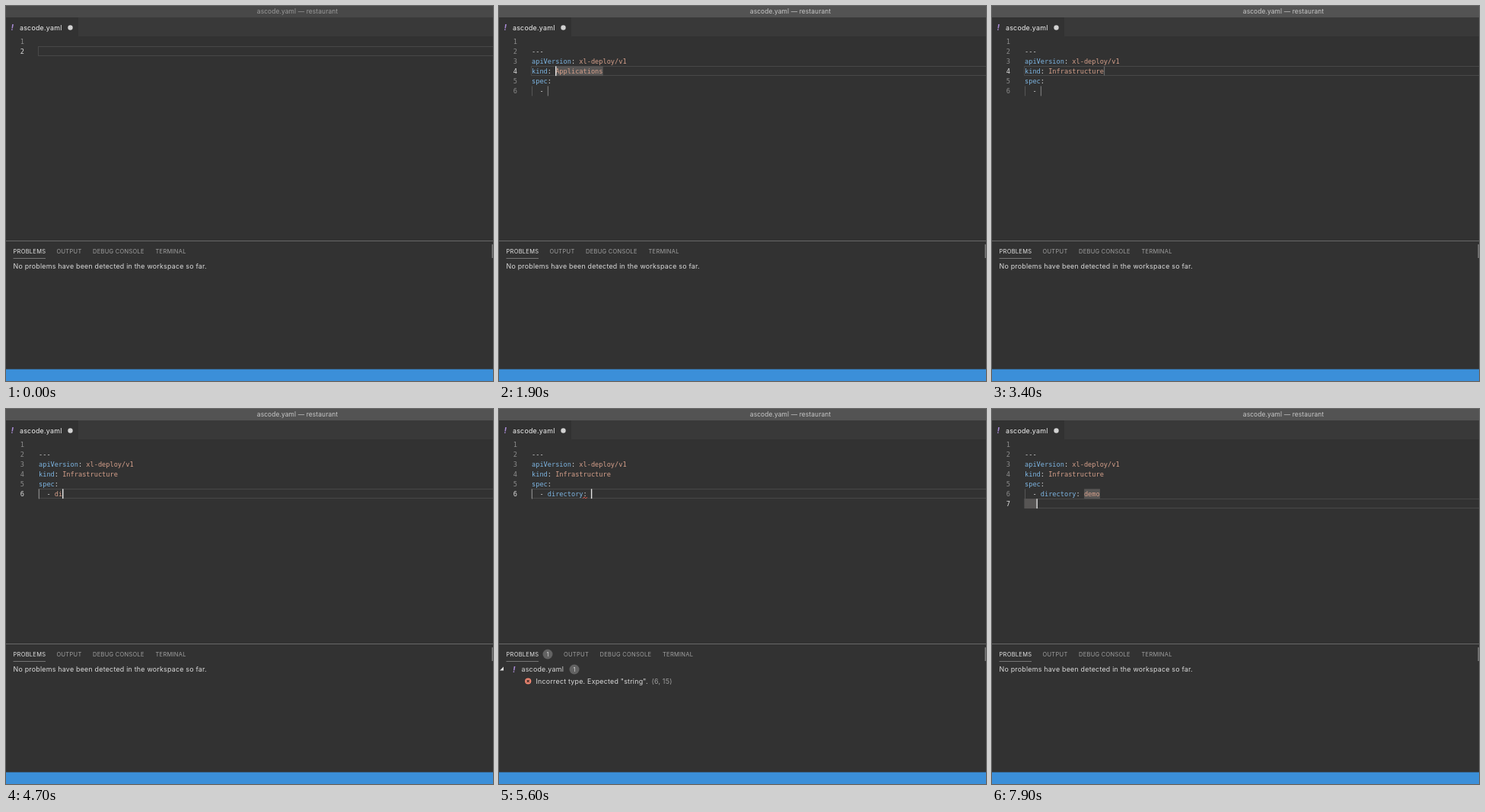
An HTML page for the animation above (8 s loop, 640 by 494 pixels).

```html
<!DOCTYPE html>
<html lang="en">
<head>
<meta charset="utf-8">
<title>Editor autocomplete</title>
<style>
  html, body { margin: 0; height: 100%; overflow: hidden; background: #323232; }
  svg { display: block; width: 640px; height: 494px; }
  text { white-space: pre; font: 8.9px Inter, sans-serif; letter-spacing: .22px; fill: #dadada; }
  .mono { font: 8.65px "DejaVu Sans Mono", monospace; letter-spacing: 0; }
  .title { font-size: 8.4px; letter-spacing: .12px; text-anchor: middle; }
  .panel { font-size: 7.5px; letter-spacing: .27px; }
  .badge { font-size: 7.3px; letter-spacing: 0; text-anchor: middle; }
  .mark { font-size: 10.5px; font-weight: 700; font-style: italic; fill: #a98bd6; }
  .number { text-anchor: end; }
  .key { fill: #7db5e2; }
  .string { fill: #d6a08b; }
  .match { fill: #2fa4f4; font-weight: 700; }
</style>
</head>
<body>
<svg id="stage" viewBox="0 0 640 494"></svg>
<script>
const LOOP = 8000, CHAR = 5.207, LEFT = 43, ROW = 13;
const stage = document.getElementById('stage');

const rect = (x, y, w, h, fill, extra = '') =>
  `<rect x="${x}" y="${y}" width="${w}" height="${h}" fill="${fill}" ${extra}/>`;
const circle = (x, y, r, fill) => `<circle cx="${x}" cy="${y}" r="${r}" fill="${fill}"/>`;
const stroke = (d, color, width = 1) =>
  `<path d="${d}" fill="none" stroke="${color}" stroke-width="${width}"/>`;
const text = (x, y, content, cls = '', fill = '') =>
  `<text x="${x}" y="${y}" class="${cls}" ${fill && `style="fill:${fill}"`}>${content}</text>`;
const span = (cls, content) => `<tspan class="${cls}">${content}</tspan>`;
const pair = (key, value = '') => `${span('key', key)}: ${span('string', value)}`;

const rowTop = row => 40.5 + ROW * (row - 1);
const columnX = column => LEFT + CHAR * column;
const typed = (word, t, start, step) =>
  word.slice(0, Math.max(0, Math.floor((t - start) / step) + 1));

function squiggle(x, y, length) {
  let d = `M${x} ${y + 1}`;
  for (let i = 1; i * 2 <= length; i++) d += `L${x + i * 2} ${y + (i % 2 ? -1 : 1)}`;
  return stroke(d, '#e0564a', .9);
}

// Times at which the editor state changes, in ms.
const AT = { focus: 800, prefix: 1600, snippet: 1900, kindList: 2000, kindErrors: 2200,
  pickKind: 2300, acceptKind: 2800, kindValid: 2900, toSpec: 3700, typeDir: 4600,
  dirList: 4900, acceptDir: 5200, dirError: 5400, typeDemo: 6600, demoValid: 7200, newLine: 7700 };

// The blink restarts at every one of these actions.
const KEYS = [AT.focus, 1600, 1700, AT.snippet, AT.pickKind, AT.acceptKind, AT.toSpec,
  4600, 4700, 4800, AT.acceptDir, 6600, 6700, 6800, AT.newLine];

function editorState(t) {
  const within = (from, to) => t >= AT[from] && t < AT[to];
  const prefix = within('prefix', 'snippet') ? typed('xl', t, AT.prefix, 100) : '';
  const state = { lines: ['', prefix], row: 2, column: prefix.length, problems: [] };

  if (t >= AT.snippet) {
    const kind = t < AT.acceptKind ? 'Applications' : 'Infrastructure';
    let item = '';
    if (t >= AT.acceptDir) {
      const value = ['', 'd', 'dem', 'demo'][Math.max(0, Math.min(3, Math.floor((t - AT.typeDemo) / 100) + 1))];
      item = pair('directory', value);
      state.column = 15 + value.length;
    } else {
      const word = typed('dir', t, AT.typeDir, 100);
      item = span('string', word);
      state.column = 4 + word.length;
    }
    state.lines = ['', '---', pair('apiVersion', 'xl-deploy/v1'), pair('kind', kind),
      span('key', 'spec') + ':', '  - ' + item];
    state.row = 6;
    if (t < AT.toSpec) {
      state.row = 4;
      state.column = t < AT.acceptKind ? 6 : 20;
    }
    if (t >= AT.newLine) {
      state.lines.push('');
      state.row = 7;
      state.column = 3;
    }
  }

  if (within('kindErrors', 'kindValid')) state.problems = [
    ['Matches multiple schemas when only one must validate.', '(2, 1)', 301.5],
    ['Incorrect type. Expected "object".', '(2, 1)', 203]];
  if (within('dirError', 'demoValid')) state.problems = [
    ['Incorrect type. Expected "string".', '(6, 15)', 200.5]];

  if (within('kindList', 'acceptKind')) state.list = {
    x: 73.5, y: 93.5, icon: enumIcon, selected: t < AT.pickKind ? 0 : 1,
    items: ['Applications', 'Infrastructure', 'Environments', 'Configuration'] };
  if (within('dirList', 'acceptDir')) state.list = {
    x: 79.5, y: 119.5, icon: wrenchIcon, selected: 0, info: true,
    items: [span('match', 'dir') + 'ectory', `staging${span('match', 'Dir')}ectoryPath`,
      `temporary${span('match', 'Dir')}ectoryPath`] };

  const lastKey = KEYS.filter(key => key <= t).pop();
  state.cursorOn = lastKey !== undefined && Math.floor((t - lastKey) / 500) % 2 === 0;
  return state;
}

function enumIcon(x, y) {
  const box = (dx, dy) => rect(x + dx, y + dy, 6.5, 4.5, '#4a4335', 'rx="1" stroke="#d2ad69"');
  return box(4.5, -4) + box(.5, -.5) +
    stroke(`M${x + 2} ${y + 1}h3.5m-3.5 1.6h3.5M${x + 6.5} ${y - 2.5}h3`, '#e0cfa5', .7);
}

function wrenchIcon(x, y) {
  return stroke(`M${x + 1.2} ${y + 4}L${x + 7} ${y - .8}`, '#d0d0d0', 2.5) +
    stroke(`M${x + 9} ${y - 3.8}A2.4 2.4 0 1 0 ${x + 10.8} ${y - 1.4}`, '#d0d0d0', 2.1);
}

function drawList({ x, y, icon, selected, items, info }) {
  let out = rect(x, y, 310.5, items.length * ROW - .8, '#2a2b2d', 'stroke="#5a5a5a"');
  out += rect(x + .5, y + ROW * selected, 309.5, ROW - .5, '#20435f');
  items.forEach((item, i) => {
    const center = y + 6 + ROW * i;
    out += icon(x + 4.5, center) + text(x + 18, center + 3.1, item, 'mono');
  });
  if (info) out += circle(375.5, 125.5, 3.9, '#5c9fd3') +
    stroke('M375.5 122.8v1.2m0 1v3', '#203f58', 1.1);
  return out;
}

function drawFrame(t) {
  const focused = t >= AT.focus;
  return rect(0, 0, 640, 494, '#323232') +
    rect(0, 0, 640, 15, focused ? '#535353' : '#484848') +
    text(383, 10.2, 'ascode.yaml — restaurant', 'title', focused ? '#c9c9c9' : '#9b9b9b') +
    rect(0, 15, 640, 25, '#393939') + rect(0, 15, 95, 25, '#323232') +
    text(6.5, 32.3, '!', 'mark') + text(18, 31.8, 'ascode.yaml', '', '#f2f2f2') +
    circle(84.5, 28.5, 3.2, '#d2d2d2') +
    rect(0, 309, 640, 1, '#686868') + rect(638.5, 314, 1.5, 18, '#7a7a7a') +
    rect(0, 478.5, 640, 15.5, '#3b8fd9');
}

function drawEditor(t, s) {
  const top = rowTop(s.row);
  let out = rect(LEFT - .5, top + .0, 600, 12, 'none', 'stroke="#484848"');
  const highlight = (column, count, row) =>
    rect(columnX(column), rowTop(row) - .2, count * CHAR, ROW - .2, '#575554');

  if (t >= AT.snippet && t < AT.acceptKind) out += highlight(6, 12, 4);
  if (t >= 6800) out += highlight(11 + 4, 4, 6);
  if (t >= AT.newLine) out += highlight(0, 3, 7);
  if (t >= AT.snippet)
    out += rect(LEFT, rowTop(6), 1, ROW, s.row === 6 ? '#858585' : '#555');
  if (t >= AT.snippet && t < AT.toSpec) out += rect(columnX(4), rowTop(6), 1, ROW, '#858585');
  if (t >= AT.acceptKind && t < AT.toSpec) out += rect(columnX(20), rowTop(4), 1, ROW - 1, '#747474');

  s.lines.forEach((line, i) => {
    const row = i + 1, baseline = rowTop(row) + 9.6;
    out += text(24, baseline, row, 'mono number', row === s.row ? '#dedede' : '#8c8c8c') +
      text(LEFT, baseline, line, 'mono');
  });

  if (s.problems.length === 2) out += squiggle(43, 65.5, 16);
  if (s.problems.length === 1) out += squiggle(110, 117, 6);
  if (s.cursorOn) out += rect(columnX(s.column) - .2, top - .2, 1.4, ROW - .2, '#e4e4e4');
  return out + (s.list ? drawList(s.list) : '');
}

function drawPanel({ problems }) {
  const count = problems.length, shift = count ? 18.5 : 0;
  const badge = (x, y) => circle(x, y, 6.5, '#626262') + text(x, y + 2.7, count, 'badge');
  let out = text(9.5, 325.8, 'PROBLEMS', 'panel', '#e4e4e4') + rect(9.5, 332, 42.5, 1, '#757575');
  [['OUTPUT', 66.5], ['DEBUG CONSOLE', 114], ['TERMINAL', 196.5]].forEach(([label, x]) => {
    out += text(x + shift, 325.8, label, 'panel', '#a0a0a0');
  });
  if (!count) return out + text(9.5, 346.1, 'No problems have been detected in the workspace so far.');

  out += badge(64, 323) + badge(99, 343) + '<path d="M6 339.5v5h-5z" fill="#e0e0e0"/>' +
    text(18, 346.7, '!', 'mark') + text(29.5, 346.1, 'ascode.yaml');
  problems.forEach(([message, place, placeX], i) => {
    const y = 358.5 + 16 * i;
    out += circle(38.2, y, 4.1, '#ef8772') +
      stroke(`M36.5 ${y - 1.7}l3.4 3.4m0 -3.4l-3.4 3.4`, '#3a2523', 1.1) +
      text(48.5, y + 3.2, message) + text(placeX, y + 3.2, place, '', '#a0a0a0');
  });
  return out;
}

let shown = '';
function render() {
  const t = performance.now() % LOOP;
  const state = editorState(t);
  const picture = drawFrame(t) + drawEditor(t, state) + drawPanel(state);
  if (picture !== shown) stage.innerHTML = shown = picture;
  requestAnimationFrame(render);
}
render();
</script>
</body>
</html>
```
